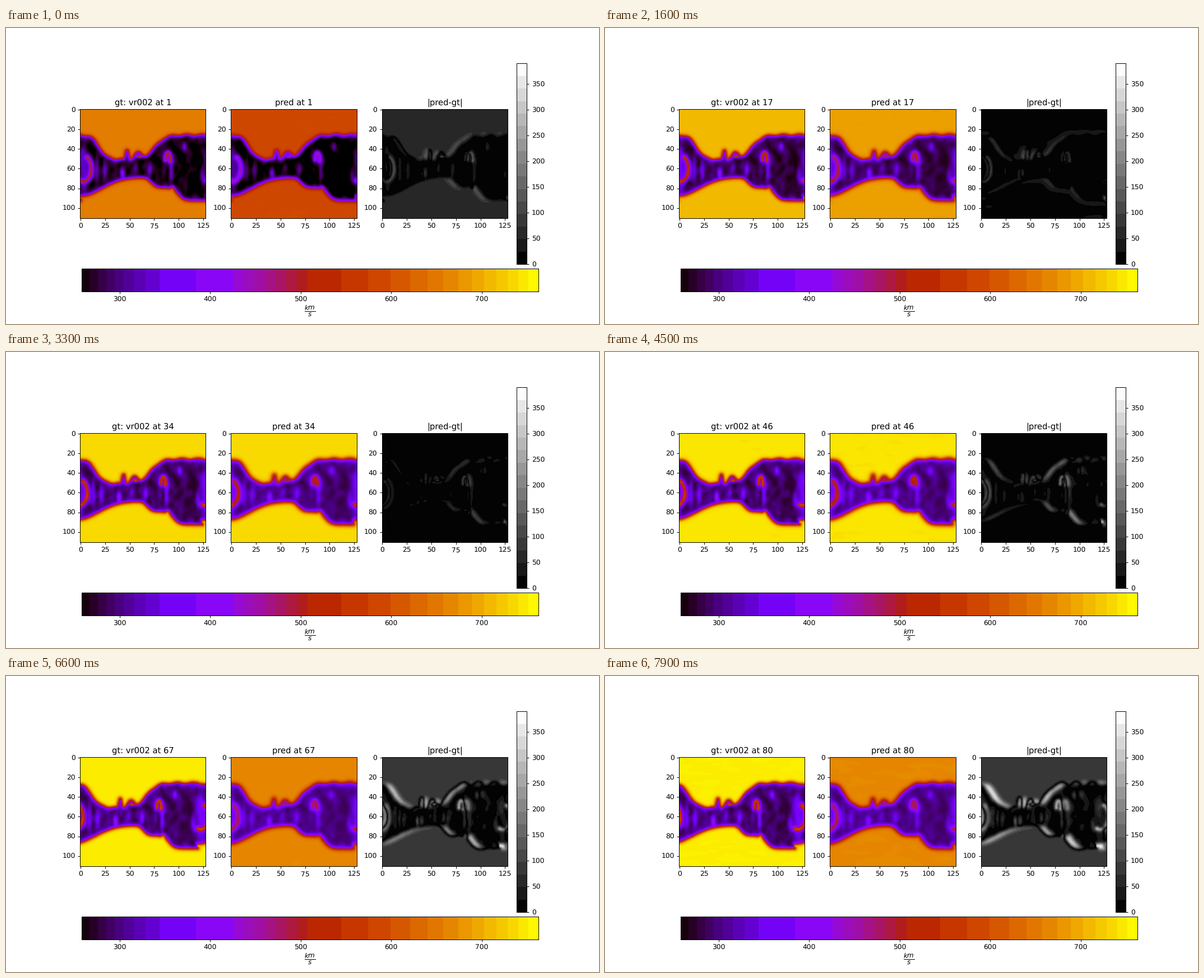
Animation, 1058 px wide and 529 px high, one loop 8000 ms. Source, as a matplotlib script:

```python
import numpy as np
import matplotlib.pyplot as plt
from matplotlib.animation import FuncAnimation
from matplotlib.colors import ListedColormap

plt.rcParams["text.hinting"] = "none"

W, H, DPI = 1058, 529, 1058 / 12
NX, NY = 128, 111
VMIN, VMAX, EMAX = 257.8, 762.5, 389.7
STEPS = 80

X, Y = np.meshgrid(np.arange(NX, dtype=float), np.arange(NY, dtype=float))
rng = np.random.default_rng(4)


def step(x, mid, width):
    return 1 / (1 + np.exp(-np.clip((x - mid) / width, -40, 40)))


def bump(x, mid, width):
    return np.exp(-((x - mid) / width) ** 2)


def wrap(dx):
    return (dx + NX / 2) % NX - NX / 2


def top_rim(x):
    hollow = 25 * (step(x, 19, 4) - step(x, 75.5, 5.5))
    spikes = 9 * bump(x, 47.3, 1.7) + 6 * bump(x, 58, 4.5)
    return 26.3 + hollow - spikes + .6 * np.sin(x * np.pi / 8)


def bottom_rim(x):
    steps = 10.5 * step(x, 72, 2.5) + 13.3 * step(x, 99.5, 3)
    return 68.4 + 19 * bump(x, 0, 30) + steps - 2.5 * bump(x, 94, 2.5)


def dist(px, py):
    d = np.full(X.shape, 1e9)
    for a, b in zip(px, py):
        d = np.minimum(d, wrap(X - a) ** 2 + (Y - b) ** 2)
    return np.sqrt(d)


def arc(cx, cy, rx, ry, start, end):
    a = np.radians(np.linspace(start, end, 60))
    return dist(cx + rx * np.cos(a), cy + ry * np.sin(a))


def blur(f, sx, sy):
    """Gaussian blur, periodic in x and mirrored in y."""
    g = np.vstack([f, f[::-1]])
    kx = np.fft.fftfreq(NX)[None, :]
    ky = np.fft.fftfreq(2 * NY)[:, None]
    k = np.exp(-2 * np.pi ** 2 * ((sx * kx) ** 2 + (sy * ky) ** 2))
    return np.fft.ifft2(np.fft.fft2(g) * k).real[:NY]


def noise(sx, sy):
    f = blur(rng.standard_normal((NY, NX)), sx, sy)
    return f / f.std()


def belt():
    """Wind field from 0 (slow) to 1 (fast)."""
    xs = np.linspace(0, NX, 512, endpoint=False)
    d = np.minimum(dist(xs, top_rim(xs)), dist(xs, bottom_rim(xs)))
    inside = (Y > top_rim(X)) & (Y < bottom_rim(X))
    d = np.where(inside, d, -d)
    edge = step(-d, .8, .95)

    inner = np.clip(.03 + .022 * noise(2, 3.2), 0, 1)
    inner += .13 * np.exp(-np.abs(d) / 1.8)
    # Upright streaks: x, y, half height, strength
    for x, y, h, amp in [(17, 58, 13, .15), (25, 62, 8, .17),
                         (42.5, 65, 5, .33), (56, 59, 5, .08),
                         (70.5, 61, 6, .18), (92, 63, 11, .20),
                         (105.5, 38, 4, .22), (124, 68, 8, .14)]:
        inner += amp * bump(X, x, 2.1) * bump(Y, y, h)
    inner += .17 * bump(wrap(X - 3), 0, 5.5) * bump(Y, 60, 24)
    inner += .65 * bump(X, 59.5, 3) * bump(Y, 47.5, 1.6)

    crescent = arc(3, 60, 8, 13, -60, 110)
    hook = arc(88.7, 50, 2.2, 6, 170, 380)
    for r, amp, w in ((crescent, .45, 2.2), (hook, .48, 1.9)):
        inner += amp * bump(r, 0, w) + .1 * bump(r, 0, 4)
    return edge + (1 - edge) * np.clip(inner, 0, .75)


def sample(f, u):
    i = np.floor(u).astype(int)
    w = u - i
    return f[:, i % NX] * (1 - w) + f[:, (i + 1) % NX] * w


FIELD = belt()
SOFT, SOFTER = blur(FIELD, .7, .7), blur(FIELD, 1.5, 1.3)
RIPPLE_A, RIPPLE_B = noise(7, 1.6), noise(6, 1.8)
COLS = np.arange(NX)
RATE = .125 + .021 * np.sin(2 * np.pi * (COLS - 68) / NX)


def settle(n):
    return 1 - np.exp((1 - n) / 18.5)


def fast(n):
    return 655 + 96 * settle(n)


def truth(n):
    lo, hi = 247 + 29 * settle(n), fast(n)
    f = sample(FIELD, COLS + RATE * (n - 1))
    return lo + (hi - lo) * f + .5 * RIPPLE_A * f


def guess(n):
    k = settle(n)
    lag = 66 * step(-n, -16, 1.5) + 84 * step(n, 52.5, 1)
    lo, hi = 237 + 51 * k, fast(n) - lag
    mix = .1 + .6 * k
    f = sample((1 - mix) * SOFT + mix * SOFTER, COLS + 1.2 + 2.8 * k)
    return lo + (hi - lo) * f + .6 * RIPPLE_B * f


fig = plt.figure(figsize=((W + .01) / DPI, (H + .01) / DPI), dpi=DPI,
                 facecolor="white")


def axes(x, y, w, h):
    return fig.add_axes([x / W, 1 - (y + h) / H, w / W, h / H])


wind = plt.get_cmap("gnuplot", 120)
levels = (np.arange(16) + .5) / 16
levels[0], levels[-1] = .012, .99
gray = ListedColormap([(g, g, g) for g in levels])

PW, PITCH, PY, PH = 224.15, 269.15, 145.47, 194.5
panels, images = [], []
for k in range(3):
    ax = axes(132.25 + k * PITCH, PY, PW, PH)
    cmap, lo, hi = (gray, 0, EMAX) if k == 2 else (wind, VMIN, VMAX)
    images.append(ax.imshow(np.zeros((NY, NX)), cmap=cmap, vmin=lo, vmax=hi,
                            aspect="auto"))
    ax.set_xticks(range(0, 126, 25))
    ax.set_yticks(range(0, 101, 20))
    panels.append(ax)
panels[2].set_title("|pred-gt|")

# Error scale
bar = axes(911.25, 63.48, 17.92, 358.48)
bar.pcolormesh([0, 1], np.linspace(0, EMAX, 17), np.arange(16)[:, None],
               cmap=gray, vmin=-.5, vmax=15.5)
bar.set_xticks([])
bar.yaxis.tick_right()
bar.set_yticks(range(0, 351, 50))

# Speed scale: even steps of blue at the low end, of green at the high end
edges = np.concatenate([
    np.arcsin(np.linspace(0, .88, 9)) / (2 * np.pi), [.25],
    np.linspace(.3325, .4945, 8)[:-1],
    np.cbrt(np.linspace(.4945 ** 3, 1, 15))])
mids = (edges[1:] + edges[:-1]) / 2
scale = axes(134.9, 430.1, 814.6, 40.73)
scale.pcolormesh(VMIN + (VMAX - VMIN) * edges, [0, 1], mids[None, :],
                 cmap="gnuplot", vmin=0, vmax=1)
scale.set_yticks([])
scale.set_xticks(range(300, 701, 100))
scale.set_xlabel(r"$\frac{km}{s}$", fontsize=14, labelpad=1.5)


def draw(i):
    n = i + 1
    a, b = truth(n), guess(n)
    for im, data in zip(images, (a, b, np.abs(b - a))):
        im.set_data(data)
    panels[0].set_title(f"gt: vr002 at {n}")
    panels[1].set_title(f"pred at {n}")
    return images


anim = FuncAnimation(fig, draw, frames=STEPS, interval=100, repeat=True,
                     repeat_delay=0, blit=False)
plt.show()
```
